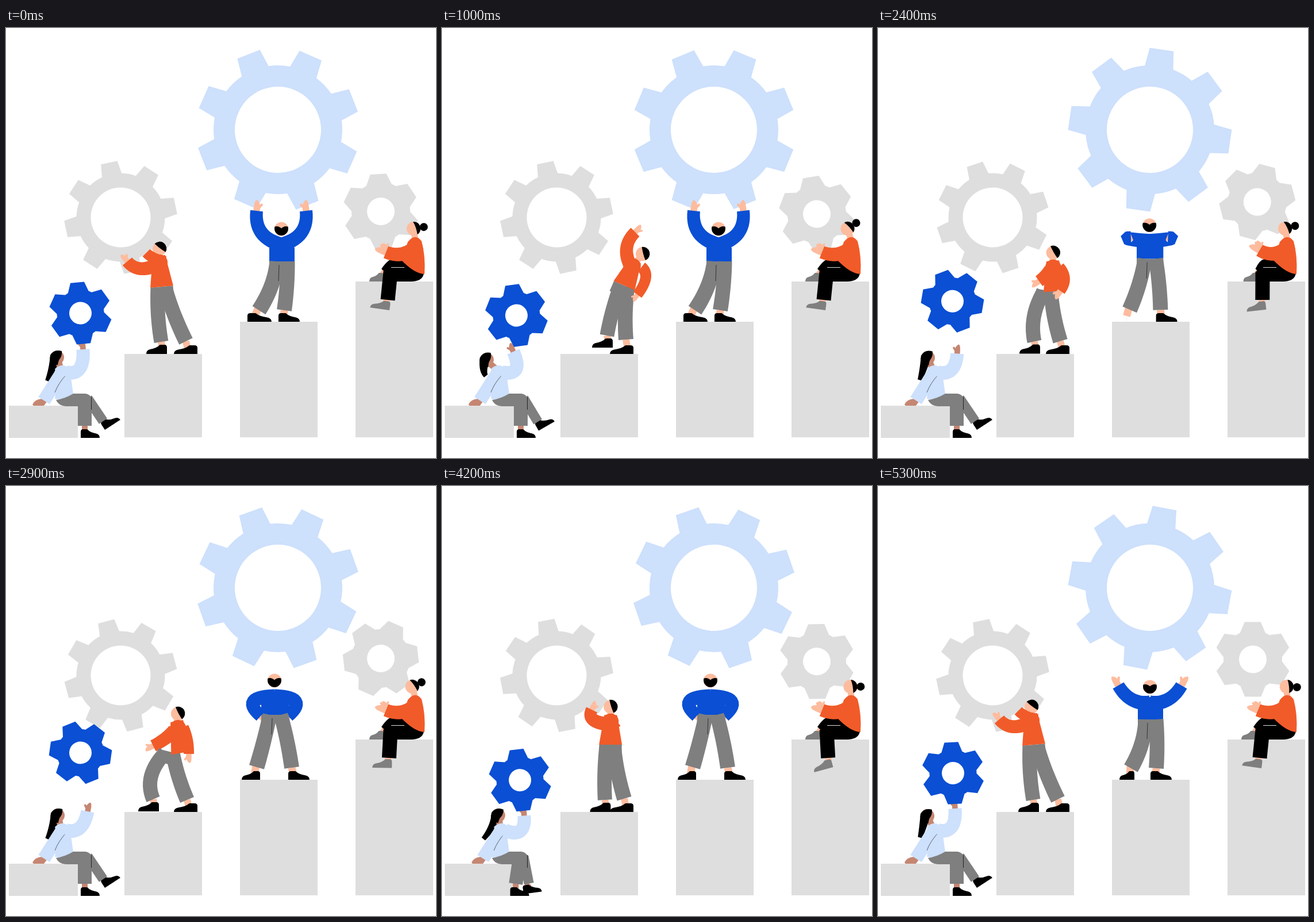
Recreate the animation shown at these times as an HTML page with a canvas. Size 748 by 748 pixels, loop 5.4 s.

```html
<!DOCTYPE html>
<html lang="en">
<head>
<meta charset="utf-8">
<title>Team turning gears</title>
<style>
html, body { margin: 0; width: 100%; height: 100%; overflow: hidden; background: #fff; }
canvas { display: block; width: 748px; height: 748px; }
</style>
</head>
<body>
<canvas id="stage" width="748" height="748"></canvas>
<script>
const g = document.getElementById('stage').getContext('2d');
const LOOP = 5400, STEP = 100, RAD = Math.PI / 180;
const KEYS = [0, 1000, 1800, 2900, 3800, 4700, 5300, LOOP];
const SKY = '#cde0fc', BLUE = '#0a4fd4', GREY = '#7f7f7f', PALE = '#dedede', ORANGE = '#f15b29',
  PEACH = '#fdbc9e', BROWN = '#c58672', BLACK = '#000';

// Motion tracks, one value per key time; angles in degrees.
const track = {
  bigTurn: [23.8, 157.5, 249, 385.3, 480, 571.8, 640.4, 653.8],
  midTurn: [33.1, 33.1, 67, 75, 80.2, 78.1, 78.1, 78.1],
  blueAt: [[129.5, 496], [129.5, 500], [129.5, 490], [129.5, 464], [130, 515], [143.5, 507], [130.5, 499.5]],
  blueTurn: [-5.9, -8.1, -18.8, -22, -5.9, -7, -3.3],
  sideAt: [[652, 319], [652, 323.5], [670, 306], [652, 300], [652, 295.5], [652, 319], [652, 301.5]],
  sideTurn: [-3.9, -9.1, 4.3, 23.6, 1.3, -3.9, -.2],
  lean: [0, -11, -6, 1, 11, 6, -3],
  tuck: [0, .1, 0, 0, 1, .45, 0],
  reach: [[134, 559], [124, 563], [132, 567], [142, 566], [140, 576], [147, 570], [134, 561]],
  nod: [-9, -33, -3, -25, 6, -9, 3],
  swing: [0, 0, 1, .3, 1, .9, 0]
};

const push = {
  hip: [271, 450], hem: [271, 450], neck: [266, 396], head: [267, 384], tilt: -20,
  near: [270, 546], far: [313, 545], bend: -5,
  elbow: [229, 428], wrist: [211, 406], backElbow: [255, 402], backWrist: [244, 391], palm: 0
};
const stretch = {
  hip: [317, 448], hem: [317, 448], neck: [336, 405], head: [349, 393], tilt: 18,
  near: [287, 535], far: [320, 542], bend: -4,
  elbow: [308, 383], wrist: [336, 355], backElbow: [365, 430], backWrist: [340, 464], palm: .7
};
const stand = {
  hip: [309, 450], hem: [309, 450], neck: [313, 400], head: [312, 384], tilt: 0,
  near: [293, 546], far: [320, 543], bend: -3,
  elbow: [310, 420], wrist: [312, 425], backElbow: [352, 430], backWrist: [316, 446], palm: .9
};
const stoop = {
  hip: [284, 462], hem: [307, 464], neck: [297, 409], head: [299, 396], tilt: 5,
  near: [256, 545], far: [315, 546], bend: -28,
  elbow: [280, 440], wrist: [256, 452], backElbow: [318, 440], backWrist: [318, 466], palm: .8
};
const gaze = { ...stand, tilt: 40, elbow: [265, 398], wrist: [296, 377], backElbow: [326, 425], backWrist: [322, 440], palm: 0 };
const walker = [push, stretch, stand, stoop, gaze, push, push];

// Elbow and wrist are offsets from the neck, mirrored for the other arm.
const hold = {
  x: 480, neck: 367, belt: 406, half: 22, elbow: [48, -3], wrist: [43, -49],
  left: [440, 491], right: [484, 491], bend: 12, shoe: [420, 462], heel: 474
};
const hips = {
  x: 468, neck: 356, belt: 398, half: 24, elbow: [61, 11], wrist: [24, 44],
  left: [436, 489], right: [497, 490], bend: 2, shoe: [442, 410], heel: 491
};
const catching = { ...hold, x: 474, elbow: [35, 14], wrist: [55, -20], shoe: [446, 420] };
const lifter = [hold, { ...hold, x: 482 }, hold, hips, hips, hips, catching];

function lerp(a, b, u) {
  if (typeof a === 'number') return a + (b - a) * u;
  if (Array.isArray(a)) return a.map((v, i) => lerp(v, b[i], u));
  return Object.fromEntries(Object.keys(a).map(k => [k, lerp(a[k], b[k], u)]));
}

function at(keys, t, linear) {
  const i = KEYS.findIndex((k, n) => t < KEYS[n + 1]);
  const u = (t - KEYS[i]) / (KEYS[i + 1] - KEYS[i]);
  return lerp(keys[i], keys[i + 1] ?? keys[0], linear ? u : u * u * (3 - 2 * u));
}

function fill(color, d) {
  g.fillStyle = color;
  g.fill(new Path2D(d));
}

function line(color, d, w = 1) {
  g.strokeStyle = color;
  g.lineWidth = w;
  g.stroke(new Path2D(d));
}

function dot(color, x, y, r) {
  g.fillStyle = color;
  g.beginPath();
  g.arc(x, y, r, 0, 7);
  g.fill();
}

function local(x, y, deg, draw, sx = 1, sy = 1) {
  g.save();
  g.translate(x, y);
  g.rotate(deg * RAD);
  g.scale(sx, sy);
  draw();
  g.restore();
}

// Tapered band along a quadratic curve.
function limb(color, [x0, y0], [cx, cy], [x1, y1], w0, w1 = w0) {
  const left = [], right = [];
  for (let i = 0; i <= 14; i++) {
    const u = i / 14, v = 1 - u, w = lerp(w0, w1, u) / 2;
    const x = v * v * x0 + 2 * u * v * cx + u * u * x1;
    const y = v * v * y0 + 2 * u * v * cy + u * u * y1;
    const a = Math.atan2(v * (cy - y0) + u * (y1 - cy), v * (cx - x0) + u * (x1 - cx));
    left.push([x + Math.sin(a) * w, y - Math.cos(a) * w]);
    right.unshift([x - Math.sin(a) * w, y + Math.cos(a) * w]);
  }
  fill(color, 'M' + left.concat(right).join('L') + 'Z');
}

const bar = (color, a, b, w0, w1) => limb(color, a, lerp(a, b, .5), b, w0, w1);

function leg(start, end, bend, w) {
  const [x, y] = lerp(start, end, .5);
  limb(GREY, start, [x + bend, y], end, 25, w);
}

// Hand continuing the line from elbow to wrist.
function hand(color, elbow, [x, y], side = 1, size = 1, turn = 0) {
  const deg = Math.atan2(y - elbow[1], x - elbow[0]) / RAD + turn;
  local(x, y, deg, () => {
    fill(color, 'M-5 -6L6 -6Q19 -6 20 -2Q18 3 9 6L-5 6Z');
    g.lineCap = 'round';
    line(color, 'M5 3L12 8', 4.5);
    g.lineCap = 'butt';
  }, size, size * side);
}

// Shoe with its heel at x, y; negative length points left.
function shoe(color, x, y, deg, len, h = 15) {
  local(x, y, deg, () => fill(color, 'M0 0V-.7Q0 -1 .12 -1H.34Q.5 -.62 .82 -.5Q1 -.4 1 0Z'), len, h);
}

function gear(color, [x, y], deg, n, outer, half, body, base, hole) {
  const b = Math.asin(base / body), o = Math.asin(half / outer), pitch = 2 * Math.PI / n;
  local(x, y, deg - 90, () => {
    g.beginPath();
    for (let i = 0; i < n; i++) {
      const a = i * pitch;
      for (const [r, q] of [[body, -b], [outer, -o], [outer, o]]) g.lineTo(r * Math.cos(a + q), r * Math.sin(a + q));
      g.arc(0, 0, body, a + b, a + pitch - b);
    }
    g.closePath();
    g.moveTo(hole, 0);
    g.arc(0, 0, hole, 0, 2 * Math.PI);
    g.fillStyle = color;
    g.fill('evenodd');
  });
}

function drawSitter(t) {
  const lean = at(track.lean, t), tuck = at(track.tuck, t), wrist = at(track.reach, t);
  const fwd = Math.max(0, lean), back = Math.max(0, -lean), shift = fwd * fwd / 15;
  const hx = 89 + lean, hy = 573 + back * .35, sx = 97 + shift;
  const elbow = [137 - (wrist[0] - 134) * .6 + fwd * 1.6, 606 + fwd * .9];
  const rest = [66 + shift, 648], wx = rest[0];
  const shin = 137 - 32 * Math.max(0, tuck - .5);
  const ankle = lerp([169, 684], [146, 694], tuck), heel = lerp([172, 699], [133, 713], tuck);

  limb(BLACK, [hx - 4, hy + 1], [hx - 8, hy + 20], [72 + back * .4, 614 - back * .8], 17, 8);
  bar(BROWN, [hx + 2, hy + 4], [sx - 2, 594], 11);
  local(hx, hy, lean * .6, () => {
    dot(BROWN, 0, 0, 12);
    fill(BLACK, 'M8 -11Q-5 -15 -12 -4Q-14 6 -9 12L1 13Q2 5 5 2Q9 -4 8 -11Z');
  });
  fill(BROWN, `M${wx - 20} 655Q${wx - 16} 646 ${wx - 4} 645L${wx + 5} 650L${wx} 657H${wx - 18}Z`);
  fill(SKY, `M${sx - 12} 593Q${sx} 582 ${sx + 10} 590L113 608L117 637Q102 650 85 645L${sx - 8} 610Z`);
  bar(SKY, [sx + 1, 598], rest, 23);
  line('#566273', `M${sx + 7} 604Q${sx - 6} 618 ${sx - 12} 634`);
  hand(BROWN, elbow, wrist, -1, .8);
  limb(SKY, [sx + 7, 599], elbow, wrist, 24, 23);
  bar(BROWN, ankle, [heel[0] + 3, heel[1] - 8], 10);
  shoe(BLACK, ...heel, -33 * (1 - tuck), 32);
  bar(GREY, [142, 644], ankle, 17);
  bar(BROWN, [shin, 690], [shin, 704], 10);
  shoe(BLACK, shin - 7 - (137 - shin) / 3.2, 713, 0, 33);
  fill(GREY, 'M87 647Q102 645 117 636H138Q147 637 151 647L149 658H104Q91 657 87 647Z');
  bar(GREY, [137 - (137 - shin) / 6, 644], [shin, 692], 24);
  line('#222', 'M148.5 642V664');
}

function drawWalker(t) {
  const p = at(walker, t), [hx, hy] = p.hip, [nx, ny] = p.neck;
  const heel = [p.near[0] + 10, p.near[1] + 21];
  const shoulder = [nx - 4, ny + 16], backShoulder = [nx + 11, ny + 11];
  bar(PEACH, p.near, [heel[0] - 8, heel[1] - 10], 12);
  bar(PEACH, p.far, [p.far[0] + 3, 558], 12);
  shoe(BLACK, ...heel, 0, -36, 16);
  shoe(BLACK, 333, 567, 0, -41, 15);
  bar(PEACH, p.head, [nx, ny + 4], 11);
  local(...p.head, p.tilt, () => {
    dot(PEACH, 0, 0, 12);
    fill(BLACK, 'M-5 -11A12 12 0 0 1 8 9Q1 1 -5 -11Z');
  });
  hand(PEACH, p.elbow, p.wrist, 1, .8);
  limb(ORANGE, shoulder, p.elbow, p.wrist, 24, 21);
  leg([hx - 7, hy + 2], p.near, p.bend, 25);
  leg([hx + 6, hy + 2], p.far, -5, 26);
  bar(GREY, p.hip, lerp(p.hip, p.neck, -.4), 39);
  dot(ORANGE, ...lerp(p.neck, p.hem, .22), 14);
  bar(ORANGE, p.neck, p.hem, 22, 40);
  if (p.palm > .02) hand(PEACH, p.backElbow, p.backWrist, 1, p.palm);
  limb(ORANGE, backShoulder, p.backElbow, p.backWrist, 20, 18);
}

function drawLifter(t) {
  const { x, neck, belt, half, elbow, wrist, left, right, bend, shoe: [heel, toe], heel: rightHeel } = at(lifter, t);
  bar(PEACH, [left[0] - 1, left[1] - 4], [lerp(heel, toe, .3), 501], 13);
  bar(PEACH, right, [rightHeel + 9, 502], 13);
  shoe(BLACK, heel, 511, 0, toe - heel);
  shoe(BLACK, rightHeel, 511, 0, 37);
  for (const side of [-1, 1]) {
    const place = ([dx, dy]) => [x - 1 + side * dx, neck + dy];
    hand(PEACH, place(elbow), place(wrist), -side, .95);
    limb(BLUE, place([0, 10]), place(elbow), place(wrist), 25, 22);
  }
  fill(BLUE, `M${x - half} ${belt}V${neck + 16}Q${x - half + 6} ${neck + 1} ${x} ${neck}Q${x + half - 6} ${neck + 1} ${x + half} ${neck + 16}V${belt}Z`);
  local(x - 1, neck - 17.5, 0, () => {
    dot(PEACH, 0, 0, 12);
    fill(BLACK, 'M-11.5 -4Q-5 -6 0 -1Q5 -6 11.5 -4A12 12 0 1 1 -11.5 -4Z');
  });
  leg([x - 9, belt], left, bend, 27);
  leg([x + 10, belt], right, 3, 26);
  fill(GREY, `M${x - half} ${belt}H${x + half}V${belt + 10}H${x - half}Z`);
  line('#333', `M${x - 5} ${belt + 6}l-1 28`);
}

function drawPercher(t) {
  const nod = at(track.nod, t), swing = at(track.swing, t);
  const carry = at(track.sideAt, t)[0] - 652, far = carry * .45;
  const head = [709 + (nod + 9) * .15, 349], elbow = [688, 401];
  const wrist = [661 + carry * .35, 390 - carry * .42], shin = 664 + 8 * swing;
  const heel = lerp([667, 491], [681, 489], swing);
  bar(PEACH, [662 + far, 418], [650 + far, 434], 9);
  shoe(GREY, 657 + far, 441, 0, -25);
  fill(BLACK, `M696 402L672 402Q664 403 ${653 + far} 419L${663 + far} 428L692 434Z`);
  bar(PEACH, [shin, 468], [heel[0] - 8, heel[1] - 9], 11);
  shoe(GREY, ...heel, 8 - 24 * swing, -34);
  bar(PEACH, head, [712, 370], 11);
  local(...head, nod, () => {
    dot(BLACK, 18, 0, 7);
    dot(PEACH, 0, 0, 12);
    fill(BLACK, 'M1 -12A12 12 0 0 1 5 11Q5 -2 1 -12Z');
  });
  fill(BLACK, 'M690 404L727 424Q727 440 706 441H664Q656 436 657 427Q659 417 672 416H690Z');
  bar(BLACK, [669, 424], [shin, 473], 25);
  line('#ddd', 'M670 416.5H693');
  fill(ORANGE, 'M699 372Q712 356 723 371Q730 397 728 428Q710 427 688 404Z');
  hand(PEACH, elbow, wrist, 1, 1);
  hand(PEACH, elbow, [wrist[0] + 2, wrist[1] - 3], 1, .75, 35);
  limb(ORANGE, [713, 382], elbow, wrist, 26, 22);
}

function draw(t) {
  g.clearRect(0, 0, 748, 748);
  gear(PALE, [199.5, 329.5], at(track.midTurn, t, true), 8, 98.5, 14.5, 77, 17.5, 52);
  gear(SKY, [473, 177], at(track.bigTurn, t, true), 8, 142.5, 21, 112, 25, 75);
  gear(PALE, at(track.sideAt, t), at(track.sideTurn, t), 6, 66.5, 14, 51, 22, 24);
  fill(PALE, 'M5 657H125V713H5ZM206 567H341V712H206ZM407 511H542V712H407ZM608 441H743V712H608Z');
  drawSitter(t);
  gear(BLUE, at(track.blueAt, t), at(track.blueTurn, t), 6, 55, 12, 41, 18, 19.5);
  drawWalker(t);
  drawLifter(t);
  drawPercher(t);
}

const start = performance.now();
function tick() {
  const t = Math.max(0, performance.now() - start) % LOOP;
  draw(Math.floor(t / STEP) * STEP);
  requestAnimationFrame(tick);
}
tick();
</script>
</body>
</html>
```
